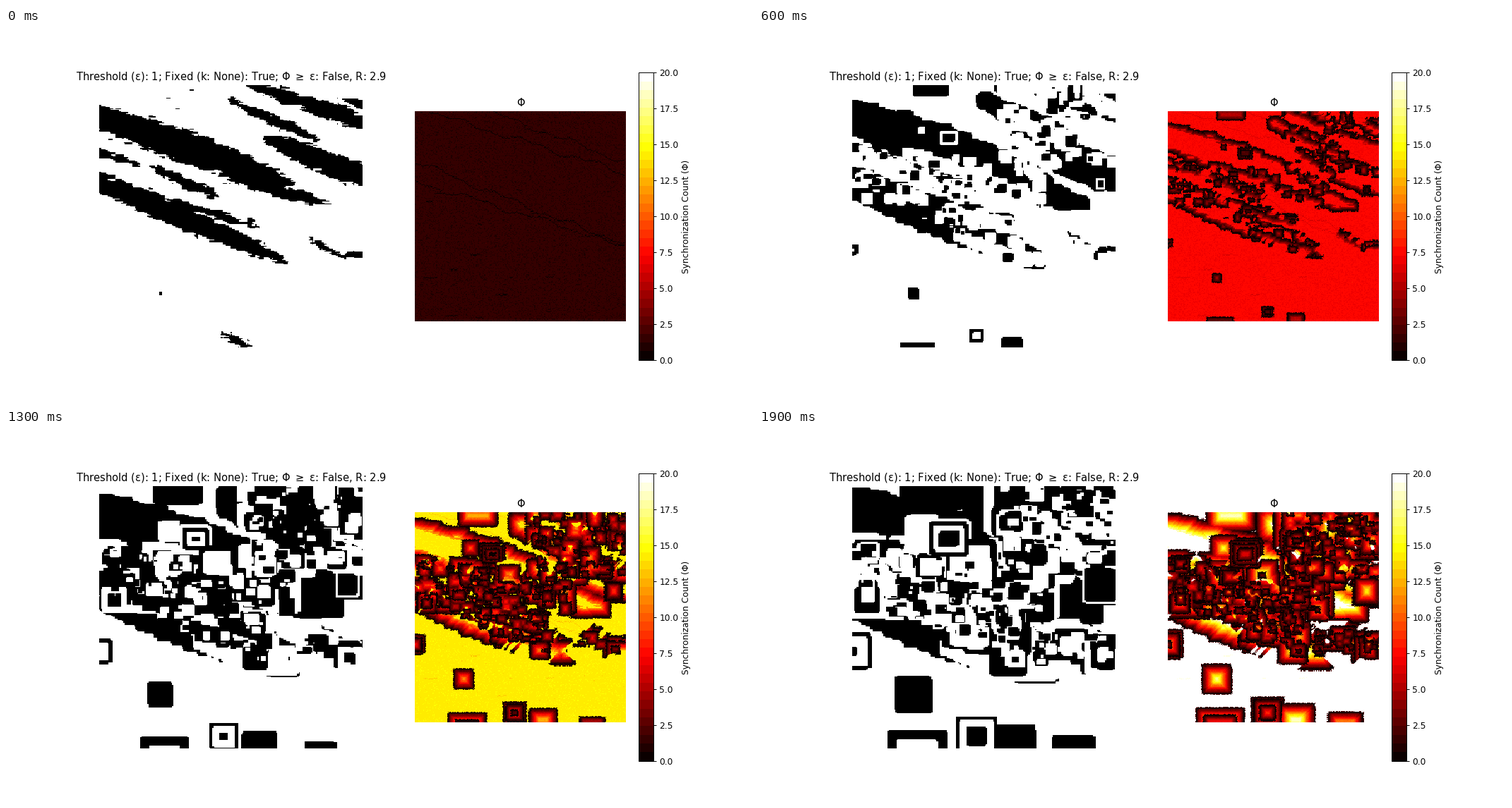
Write a matplotlib script that moves like this. It is 1058x529 px and loops after 2 s.

```python
import numpy as np
import matplotlib.pyplot as plt
from matplotlib.animation import FuncAnimation

W, H = 1058, 529
STEPS, N = 20, 256
X0, Y0, CELL = 132.25, 80.8, 372.7 / 256    # state panel in stage pixels
U0, V0, CELL_PHI = 579.5, 118, 298.2 / 256  # count panel
rng = np.random.default_rng(11)

# Dark streaks: start point, end point, greatest half height
BANDS = [
    (330, 76, 600, 165, 12), (470, 100, 540, 116, 5), (312, 102, 445, 160, 8),
    (362, 156, 560, 232, 18), (70, 107, 410, 222, 24), (300, 208, 462, 252, 9),
    (100, 167, 197, 196, 5), (205, 198, 304, 240, 8), (60, 188, 398, 332, 18),
    (213, 238, 362, 283, 6), (428, 299, 476, 326, 4), (472, 322, 540, 321, 5),
]
TAIL = (303, 433, 348, 453, 6)

# Pulsing sources: x, y, width, height, then the steps at which they flip colour
PULSES = [
    (217, 375, 4, 4, 2), (231, 286, 1, 1, 2), (152, 241, 4, 4, 2, 8),
    (132, 316, 1, 2, 1, 5, 15), (483, 219, 5, 8, 3, 5), (306, 435, 6, 5, 1, 4, 11),
    (264, 154, 12, 6, 1, 4, 8, 13), (206, 452, 40, 1, 3, 12), (351, 447, 16, 6, 1),
    (432, 452, 30, 1, 8), (226, 86, 36, 6, 1), (444, 90, 8, 7, 1),
    (231, 145, 1, 1, 3), (290, 182, 24, 10, 2),
]

# Dark lines in the first count map: start and end
TRACES = [(600, 120, 876, 206), (690, 122, 876, 190),
          (580, 191, 876, 309), (580, 219, 876, 308)]

rows, cols = np.mgrid[:N, :N]
px, py = X0 + (cols + 0.5) * CELL, Y0 + (rows + 0.5) * CELL


def blocks(h, w, size):
    """Random field that is constant over blocks of h by w cells."""
    coarse = rng.normal(0, size, (N // h, N // w))
    return np.kron(coarse, np.ones((h, w)))


def band(x0, y0, x1, y1, half):
    x = px + rng.normal(0, 1.5, (N, 1))
    u = np.clip((x - x0) / (x1 - x0), 0, 1)
    limit = half * np.sin(np.pi * u) ** 0.6
    rough = blocks(2, 8, 1.5) + blocks(4, 16, 1.5)
    return (limit > 0.8) & (abs(py - y0 - u * (y1 - y0) + rough) < limit)


def dilate(a):
    """One cell outward, with slightly rounded corners."""
    p = np.pad(a, 1, mode="edge")
    near = {(i, j): p[i:i + N, j:j + N] for i in range(3) for j in range(3)}
    cross = np.max([v for (i, j), v in near.items() if 1 in (i, j)], axis=0)
    square = np.max(list(near.values()), axis=0)
    return np.where(rng.random(a.shape) < 0.85, square, cross)


def busy_zone():
    """Where new fronts keep breaking out."""
    x = px - X0
    below_ridge = (py > 168 + 0.13 * x) | (px > 345)
    above_plain = py < np.minimum(228 + 0.45 * x, 332)
    calm = (px > 400) & (py > 195) & (py < 295)
    return below_ridge & above_plain & ~calm


def trace_map():
    hit = np.zeros((N, N), bool)
    for x0, y0, x1, y1 in TRACES:
        c = np.arange(int((x0 - U0) / CELL_PHI) + 1, int((x1 - U0) / CELL_PHI))
        line = np.linspace(y0, y1, c.size) - V0
        wave = 3 * np.sin(c / 13 + y0) + 2 * np.sin(c / 5.3)
        r = (line + wave) / CELL_PHI + rng.normal(0, 0.6, c.size)
        hit[np.clip(r, 0, N - 1).astype(int), c] = True
    for _ in range(14):
        r, c = rng.integers(90, N - 2), rng.integers(0, 200)
        n = rng.integers(3, 18)
        hit[r + rng.integers(0, 2, n), c + np.arange(n)] = True
    return hit


def count_map(age, dark, step):
    phi = age + 0.35 + rng.normal(0, 0.15, age.shape)
    if step:
        edge = dilate(dark) != 1 - dilate(1 - dark)
        phi[edge & (rng.random(age.shape) < 0.6)] *= 0.1
    return np.clip(phi, 0, 20)


def pulse(stamp, x, y, w, h):
    r, c = int((y - Y0) / CELL), max(0, int((x - X0) / CELL))
    area = np.s_[r:r + max(1, round(h / CELL)), c:c + max(1, round(w / CELL))]
    stamp[area] = stamp[area].max() + 3


def simulate():
    """Fronts spread one cell a step and a higher stamp overruns a lower one.
    Odd stamps are dark, even ones light; the count is the time since a flip."""
    stamp = np.any([band(*b) for b in BANDS], axis=0).astype(int)
    first = stamp | band(*TAIL)
    for r, c in rng.integers(0, 130, (8, 2)):
        first[r, c:c + 4] = 1
    pulse(first, *PULSES[0][:4])
    zone = busy_zone()
    age = np.where(trace_map(), 0, 1)
    frames = [(first, count_map(age, first, 0))]

    for step in range(1, STEPS):
        if step == 1:
            lower_edge = (stamp == 1) & (np.roll(stamp, -1, axis=0) == 0)
            new = stamp + (lower_edge & zone)
        else:
            new = dilate(stamp)
        for x, y, w, h, *times in PULSES:
            if step in times:
                pulse(new, x, y, w, h)
        for r, c in rng.integers(2, N - 3, (100, 2)):
            if zone[r, c] and new[r, c]:
                h, w = rng.integers(0, 2), rng.integers(0, 3)
                new[r - h:r + h + 1, c - w:c + w + 1] = new[r, c] + 1
        age = np.where(new % 2 != stamp % 2, 0, age + 1)
        stamp = new
        frames.append((stamp % 2, count_map(age, stamp % 2, step)))
    return frames


FRAMES = simulate()
plt.rcParams["font.family"] = "DejaVu Sans"
fig, (ax_state, ax_count) = plt.subplots(1, 2, figsize=(12, 6), dpi=W / 12)
state = ax_state.imshow(FRAMES[0][0], cmap="gray_r", vmin=0, vmax=1,
                        interpolation="nearest")
count = ax_count.imshow(FRAMES[0][1], cmap=plt.get_cmap("hot", 33), vmin=0, vmax=20,
                        interpolation="nearest")
fig.colorbar(count, ax=ax_count, label="Synchronization Count (Φ)")
ax_state.set_title(r"Threshold (ε): 1; Fixed (k: None): True; Φ $\geq$ ε: False, R: 2.9")
ax_count.set_title("Φ")
for ax in (ax_state, ax_count):
    ax.axis("off")


def draw(i):
    dark, phi = FRAMES[i]
    state.set_data(dark)
    count.set_data(phi)
    return state, count


anim = FuncAnimation(fig, draw, frames=STEPS, interval=100, repeat=True)
plt.show()
```
